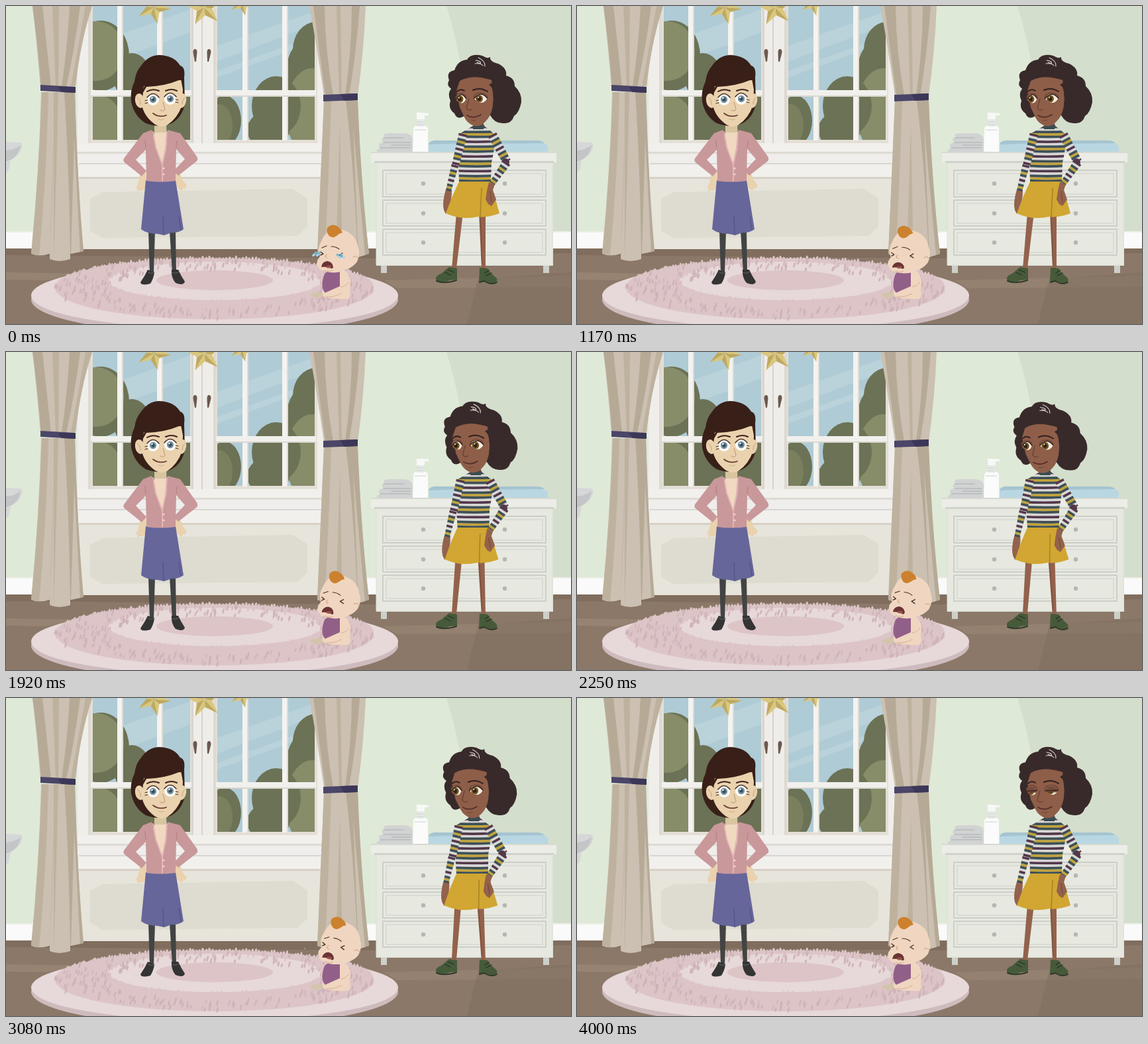
An HTML page with a canvas that plays this animation: 853x480 px, repeating every 4080 ms.

```html
<!DOCTYPE html>
<html lang="en">
<head>
<meta charset="utf-8">
<title>Nursery</title>
<style>
html, body { margin: 0; width: 100%; height: 100%; overflow: hidden; }
canvas { display: block; width: 853px; height: 480px; }
</style>
</head>
<body>
<canvas id="stage" width="853" height="480"></canvas>
<script>
const LOOP = 4080, STEP = 250 / 3;
const stage = document.getElementById('stage').getContext('2d');
const backdrop = document.createElement('canvas');
backdrop.width = 853;
backdrop.height = 480;
let c = backdrop.getContext('2d');

function shape(d, fill) {
  c.fillStyle = fill;
  c.fill(new Path2D(d));
}
function line(d, color, width = 1) {
  c.strokeStyle = color;
  c.lineWidth = width;
  c.lineCap = c.lineJoin = 'round';
  c.stroke(new Path2D(d));
}
function box(x, y, w, h, fill) {
  c.fillStyle = fill;
  c.fillRect(x, y, w, h);
}
function oval(x, y, rx, ry, fill, turn = 0) {
  c.fillStyle = fill;
  c.beginPath();
  c.ellipse(x, y, rx, ry, turn, 0, Math.PI * 2);
  c.fill();
}
function clipped(d, draw) {
  c.save();
  c.clip(new Path2D(d));
  draw();
  c.restore();
}
function seeded(seed) {
  return () => (seed = (seed * 16807) % 2147483647) / 2147483647;
}
function keyed(t, keys) {
  for (let i = 1; i < keys.length; i++) {
    const [t0, a] = keys[i - 1], [t1, b] = keys[i];
    if (t <= t1) {
      const p = Math.max(0, (t - t0) / (t1 - t0));
      return a + (b - a) * p * p * (3 - 2 * p);
    }
  }
  return keys[keys.length - 1][1];
}

function room() {
  box(0, 0, 853, 480, '#dfe9d7');
  shape('M665 0Q677 38 686 85L730 220V366H853V0Z', '#d4decd');
  box(0, 340, 853, 27, '#fafafa');
  box(0, 340, 853, 2, '#eef0ea');
  box(0, 366, 853, 114, '#8b7868');
  shape('M0 366H853V373L560 381L0 376Z', '#806d5d');
  shape('M0 402L120 404L60 414L0 413Z', '#968371');
  shape('M570 414L853 407V424L590 426Z', '#948170');
  shape('M713 412L853 402V480H696Z', '#7f6c5c80');
  shape('M0 205L22 206Q27 209 22 219Q15 231 0 235Z', '#d6d7d8');
  shape('M0 218Q13 217 22 210Q20 228 0 235Z', '#c3c5c7');
  shape('M0 236L7 233L4 248L0 251Z', '#d5d7d7');
}

function star(x, y, r, turn) {
  const at = (i, q) => {
    const a = turn + i * Math.PI / 5;
    return `${x + Math.sin(a) * q} ${y - Math.cos(a) * q}`;
  };
  for (let i = 0; i < 10; i++) {
    const q = i % 2 ? r * .42 : r, n = i % 2 ? r : r * .42;
    shape(`M${x} ${y}L${at(i, q)}L${at(i + 1, n)}Z`, i % 2 ? '#d9c77e' : '#bfa95f');
  }
}

function windowWall() {
  const dark = '#6c7255', light = '#878c69';
  box(108, 0, 372, 262, '#efeeeb');
  box(124, 0, 4, 208, '#dfdad1');
  box(128, 0, 342, 207, '#e4dfd6');
  clipped('M131 0H278V202H131ZM319 0H466V202H319Z', () => {
    box(128, 0, 342, 207, '#afcbd5');
    shape('M176 42L278 5V40L176 78ZM319 60L466 8V28L319 84Z', '#bad2da');
    shape('M319 98L466 45V54L319 108Z', '#bad2da');
    oval(143, 75, 43, 53, dark);
    oval(190, 106, 28, 35, dark);
    oval(136, 68, 42, 45, light);
    oval(178, 180, 54, 54, dark);
    oval(137, 176, 38, 42, light);
    oval(270, 180, 28, 50, dark);
    oval(330, 173, 25, 38, dark);
    oval(322, 180, 20, 32, '#7a805e');
    oval(468, 66, 35, 42, dark);
    oval(456, 100, 33, 50, dark);
    oval(462, 160, 40, 66, light);
    oval(408, 151, 37, 45, dark);
    oval(396, 187, 32, 28, dark);
  });
  for (const x of [168, 228, 357, 417]) {
    box(x, 0, 9, 203, '#f4f3f0');
    box(x + 7, 0, 2, 203, '#dedbd3');
  }
  for (const x of [128, 316]) {
    box(x, 127, 152, 10, '#f1f0ed');
    box(x, 135, 152, 2, '#d9d7ce');
  }
  box(280, 0, 36, 207, '#efedea');
  box(280, 0, 3, 220, '#dcd5cc');
  box(295, 0, 2, 220, '#d8d2c9');
  box(313, 0, 4, 207, '#ded9d0');
  for (const [x, lean] of [[285.5, 1.5], [306.5, -.5]]) {
    shape(`M${x - 3} 70Q${x - 3} 65 ${x} 65Q${x + 3} 65 ${x + 3} 70L${x + lean} 84H${x + lean - 2}Z`, '#695950');
  }
  box(108, 207, 372, 14, '#f1f0ed');
  box(108, 220, 372, 3, '#dedbd4');
  box(104, 223, 380, 15, '#efeeec');
  box(110, 237, 370, 2, '#d9d7d2');
  box(110, 239, 370, 20, '#f1f0ed');
  box(110, 258, 370, 3, '#d7d0c6');
  box(110, 261, 370, 106, '#e7e4db');
  shape('M127 291L146 281L433 276L455 290V333L440 347L145 350L127 339Z', '#dedbd0');
  star(223, 2, 26, .4);
  star(299, 2, 29, -.15);
  star(357, -4, 19, .4);
}

function curtains() {
  const cloth = '#cbc0b1', fold = '#b6aa96', soft = '#beb29f';
  shape('M40 0H130Q112 55 105 121L52 124Q47 60 40 0Z', cloth);
  shape('M40 0H55L68 122H53Q48 60 40 0Z', fold);
  shape('M70 0H80L79 121H75Z', soft);
  shape('M96 0H112Q104 62 91 122H84Q93 60 96 0Z', fold);
  shape('M120 0H130Q112 55 105 121L98 122Q109 60 120 0Z', soft);
  shape('M53 130L104 130Q108 270 117 370L97 374V382Q80 388 66 382V374Q50 379 38 374Q50 250 53 130Z', cloth);
  shape('M54 130H64Q61 260 50 376L38 374Q50 250 54 130Z', soft);
  shape('M72 180L66 381V374Q72 260 72 130H79Q76 260 72 384Z', soft);
  shape('M88 130H104Q108 270 117 370L97 374Q95 240 88 130Z', fold);
  shape('M103 200L112 371L98 374Z', cloth);
  shape('M52 119L105 122V131L52 128Z', '#4b4568');
  shape('M78 122L105 122V131L84 130Z', '#3c3758');
  shape('M458 0H543Q540 70 531 135H480Q470 65 458 0Z', cloth);
  shape('M464 0H481Q482 70 494 135H482Q473 65 464 0Z', fold);
  shape('M499 0H505L507 135H503Z', soft);
  shape('M522 0H534Q529 70 518 135H512Q522 65 522 0Z', fold);
  shape('M480 142H531Q536 270 548 374L531 379Q499 385 470 374Q475 260 480 142Z', cloth);
  shape('M480 142H491Q487 270 481 378L470 374Q475 260 480 142Z', soft);
  shape('M504 180L498 380L508 381Z', soft);
  shape('M513 142H531Q536 270 548 374L531 379Q526 250 513 142Z', fold);
  shape('M524 180L542 376L532 379Z', cloth);
  shape('M479 134L531 132V142L479 144Z', '#4b4568');
  shape('M505 133L531 132V142L510 143Z', '#3c3758');
}

function dresser() {
  shape('M565 215Q559 207 570 206Q563 199 573 199Q565 192 580 192H602Q613 193 614 201V220H560Q558 216 565 215Z', '#d1d3d3');
  line('M570 199H600M570 206H611M565 214H611M582 210H611', '#b8bbbc', 1.3);
  shape('M638 208Q640 202 655 203H802Q812 203 814 210V216H638Z', '#a5c4d0');
  shape('M638 209Q700 206 740 208L812 207Q819 208 818 220H638Z', '#b9d7e2');
  shape('M615 186Q615 182 619 181H633Q637 182 637 186V220H614Z', '#fafbfa');
  box(621, 171, 10, 11, '#e6e9e8');
  shape('M620 169V163L618 162Q620 160 638 162V165H632V171H620Z', '#f7f8f7');
  line('M621 175H630M621 179H630M617 187H634', '#cbd1d0');
  box(566, 390, 9, 13, '#cdcfc9');
  box(811, 390, 9, 13, '#cdcfc9');
  box(559, 233, 267, 159, '#e7e9e0');
  box(551, 220, 280, 16, '#ecede7');
  box(551, 220, 280, 2, '#d6d9d2');
  box(556, 234, 271, 3, '#cfd3cb');
  line('M559 237V391H825V237', '#dcdfd7');
  for (const [y, h] of [[248, 40], [293, 39], [337, 39]]) {
    c.strokeStyle = '#cbcfc8';
    c.lineWidth = 2;
    c.strokeRect(569, y, 246, h);
    c.strokeStyle = '#dadcd5';
    c.strokeRect(574, y + 5, 236, h - 9);
    oval(630, y + 20, 3.2, 3.2, '#b4b7b1');
    oval(753, y + 20, 3.2, 3.2, '#b4b7b1');
  }
}

function rug() {
  const rnd = seeded(41), rose = '#dcc4c7', pale = '#e7d8d9', tuft = '#ceb3b7';
  oval(315, 443, 277, 52, '#cebbbd');
  oval(315, 437, 277, 50, pale);
  oval(315, 427, 239, 46, rose);
  for (let i = 0; i < 150; i++) {
    const a = Math.PI + Math.PI * i / 149, x = 315 + 238 * Math.cos(a), y = 427 + 44 * Math.sin(a);
    oval(x, y, 2.2, 3 + rnd() * 4, rose, .3 * (rnd() - .5));
  }
  oval(316, 415, 161, 29, pale);
  oval(315, 414, 88, 15, rose);
  for (let i = 0; i < 300; i++) {
    const a = rnd() * Math.PI * 2, r = .68 + rnd() * .34;
    oval(315 + 237 * r * Math.cos(a), 427 + 43 * r * Math.sin(a), 1.4, 3 + rnd() * 1.7, i % 3 ? tuft : '#d4babe', .25);
  }
  for (let i = 0; i < 50; i++) {
    const a = rnd() * Math.PI * 2;
    oval(315 + 163 * Math.cos(a), 416 + 30 * Math.sin(a), 1.5, 4, rose, .2);
  }
}

function mother() {
  const skin = '#ead2ae', hair = '#382019', pink = '#c9989a', ink = '#343434';
  shape('M215 340H225L223 404H217ZM247 340H256L257 402H251Z', '#414443');
  shape('M214 398L224 402Q223 411 218 419Q204 423 203 417Q210 407 214 398Z', ink);
  shape('M250 398L260 398Q264 407 270 416Q268 423 256 418Q249 410 250 398Z', ink);
  line('M215 402Q220 405 224 402M250 402Q255 405 261 401', '#656767');
  shape('M202 254L211 251L212 270Q209 281 203 278L198 280L199 275L196 276Q201 266 202 254Z', skin);
  shape('M256 250L264 255Q266 265 273 270L270 276L267 275L266 279Q258 277 255 266Z', skin);
  shape('M211 263H256L268 337Q260 343 250 342L239 346L229 344Q213 344 204 337Z', '#66669a');
  line('M237 318L238 345M261 318L264 338', '#55558a', 1.5);
  shape('M224 174H242V194L250 205L235 230L217 204L224 193Z', '#d9c59f');
  shape('M224 191H242L244 220L235 240L220 212Z', '#f0d9c0');
  shape('M220 187L207 192L178 230Q176 234 180 237L205 257L212 249L196 232L211 217L212 264Q233 267 256 264L257 216L270 231L253 249L260 256L287 235Q291 232 288 227L263 192L244 187L242 216L236 239L226 213Z', pink);
  line('M222 190L226 213L236 240L241 214L243 190M236 240V264', '#e2b5b5', 2);
  line('M211 214L210 202M257 214L258 203', '#b48286', 1.2);
  for (const y of [245, 254]) oval(238, y, 1.5, 1.5, '#f0d5cf');
  shape('M204 90Q215 74 232 74Q254 75 263 90Q271 92 269 108L270 148Q266 168 250 177Q233 185 211 177Q193 166 189 144Q187 128 194 114Q196 99 204 90Z', hair);
  oval(266, 143, 6, 11, skin, .18);
  oval(202, 143, 7, 11, skin, -.2);
  shape('M208 121Q230 121 252 109L262 99L267 126L266 149Q259 170 243 180Q234 185 224 178Q207 165 205 148Z', skin);
  shape('M205 134Q206 111 242 103L267 96L269 112L261 112Q240 121 212 122Z', hair);
  line('M198 138Q204 142 203 149M270 138Q266 141 266 148', '#c6a17d');
  for (const [x, y, side] of [[222, 141, -1], [248, 140, 1]]) {
    oval(x, y, 9, 9, '#fcfcfa');
    oval(x, y, 5.1, 5.3, '#748f9c');
    oval(x, y, 2.5, 2.7, '#334b58');
    oval(x - 1.5, y - 2, 1.2, 1.2, '#fff');
    line(`M${x - 9} ${y - 3}Q${x} ${y - 14} ${x + 9} ${y - 3}`, '#4b352d', 1.6);
    for (const n of [1, 5]) line(`M${x + side * 8} ${y + n}L${x + side * 12} ${y + n + 1}`, '#3b2923');
  }
  line('M213 129Q221 124 231 128M241 128Q250 124 258 128', '#3a241d', 2);
  line('M237 145L240 156Q237 160 233 157', '#c7a17d', 1.2);
  line('M222 162Q231 169 242 165', '#6b3d32', 1.8);
  line('M230 171Q234 173 238 171', '#d4ac89');
}

const KNIT = ['#53384a', '#d8d7d6', '#3d5057', '#c1a33f', '#3d5057', '#d8d7d6'];

function sleeve(x0, y0, x1, y1, w0, w1) {
  const len = Math.hypot(x1 - x0, y1 - y0);
  c.save();
  c.translate(x0, y0);
  c.rotate(Math.atan2(y1 - y0, x1 - x0));
  clipped(`M0 ${-w0 / 2}L${len} ${-w1 / 2}V${w1 / 2}L0 ${w0 / 2}Z`, () => {
    for (let x = 0, i = 0; x < len; x += 3.7, i++) box(x, -w0, 4, w0 * 2, KNIT[i % 6]);
  });
  c.restore();
}

function friendHead(lid) {
  const skin = '#8e5e49', dark = '#764a39', hair = '#382a2a';
  shape('M677 97Q682 82 696 81Q702 71 719 75Q727 80 731 77Q730 84 743 87Q757 94 755 105Q768 108 768 121Q779 131 778 145Q775 161 767 166Q763 178 752 177Q738 178 731 165L692 166Q681 173 677 162Q667 155 671 143Q666 132 672 125Q664 119 669 112Q664 99 677 97Z', hair);
  shape('M680 128L685 113Q704 103 733 110L736 140Q735 162 726 172Q717 183 707 181Q697 178 692 168L685 153Z', skin);
  shape('M681 130Q678 119 686 112Q704 102 737 113L733 99L700 98L678 110Z', hair);
  shape('M729 119Q738 123 735 151Q744 157 747 140L741 111Z', hair);
  line('M709 82Q718 83 716 87L711 85M713 78Q724 83 723 91M708 87Q717 86 720 90', '#d9d3d2', 1.1);
  for (const [x, y, rx] of [[687, 140.5, 7.5], [716.5, 140, 10]]) {
    oval(x, y - 2, rx + 1, 7.5, dark);
    clipped(`M${x - rx} ${y}Q${x - 2} ${y - 15} ${x + rx} ${y}Q${x + 2} ${y + 12} ${x - rx} ${y}Z`, () => {
      box(x - 12, y - 9, 24, 18, '#f4eee2');
      oval(x - 2, y, 5.4, 5.8, '#75521e');
      oval(x - 2, y, 2.8, 3.1, '#302015');
      oval(x - 3.3, y - 2, 1, 1, '#fff');
      box(x - 12, y - 9, 24, 2 + lid * 13, dark);
    });
    const top = y - 13 + lid * 18;
    line(`M${x - rx} ${y}Q${x} ${top} ${x + rx} ${y - 1}`, '#382622', 1.5);
  }
  line('M681 129Q686 124 692 128M705 127Q716 122 727 129', '#30211f', 2);
  line('M699 140L695 154Q698 159 703 156', '#66402f', 1.2);
  line('M696 165Q705 171 717 164', '#56302a', 1.8);
  line('M703 173Q707 174 710 172', '#70432f');
}

function friend(t) {
  const skin = '#93624c', sway = keyed(t, [[1250, 0], [1500, -.3], [2250, -9], [3670, -9], [4000, 0]]);
  const nod = keyed(t, [[1170, 0], [1500, -2], [2000, -1], [2250, 0], [2920, 1], [3670, 1], [4000, 0]]);
  const dip = keyed(t, [[1500, 0], [2250, 1.5], [2920, 0]]);
  const lid = keyed(t, [[3580, 0], [3670, .3], [3830, 1], [4000, .72], [4080, 0]]);
  c.save();
  c.transform(1, 0, -sway / 300, 1, sway * 4 / 3, 0);
  shape('M680 312H690L680 396H673ZM714 312H724L724 397H718Z', skin);
  line('M716 320L719 389', '#7d503d', 1.3);
  shape('M664 277L673 278Q673 293 669 302L664 314L661 308Q658 297 664 277Z', skin);
  shape('M685 263H731L745 313Q727 320 713 318Q688 324 664 313Q672 290 685 263Z', '#d1a632');
  line('M718 275L716 318', '#a88224', 1.5);
  shape('M705 175H721V194H705Z', '#7d503d');
  const torso = 'M705 181Q713 184 722 181L737 193Q739 214 733 236L732 265H684L683 234Q679 210 686 192Z';
  clipped(torso, () => {
    for (let y = 180, i = 0; y < 267; y += 3.7, i++) {
      c.fillStyle = KNIT[i % 6];
      c.beginPath();
      c.moveTo(675, y);
      c.quadraticCurveTo(710, y + 2, 745, y);
      c.lineTo(745, y + 4);
      c.quadraticCurveTo(710, y + 6, 675, y + 4);
      c.fill();
    }
  });
  sleeve(690, 193, 678, 243, 13, 11);
  sleeve(678, 240, 668, 279, 11, 8);
  sleeve(734, 194, 756, 235, 14, 13);
  oval(754, 236, 6, 6, '#53384a');
  sleeve(756, 236, 734, 268, 13, 9);
  shape('M729 266L738 269L735 278L740 292L733 302L728 299L724 292L726 279Z', skin);
  line('M731 280L733 296', '#72452f');
  shape('M705 179Q713 182 722 179L721 186H705Z', '#394d50');
  c.translate(nod, dip);
  friendHead(lid);
  c.restore();
  const boot = '#465a3a';
  shape('M669 394L681 396L681 413L670 414Q663 418 650 415Q646 408 657 404Z', boot);
  shape('M715 395L727 396L732 403L741 411Q743 419 734 419L722 415L714 417Z', boot);
  line('M650 415Q661 420 680 414M715 417L722 415Q733 422 741 417', '#2e3728', 2);
  line('M663 402L671 406M667 398L676 402M723 403L729 399M725 407L733 403', '#263020', 1.3);
}

function baby(t) {
  const skin = '#f0d6c0', ink = '#493529';
  const turn = keyed(t, [[0, 0], [750, -.045], [1500, .02], [2250, .075], [3080, .09], [3670, .08], [4000, 0]]);
  const drop = keyed(t, [[0, 0], [750, 2], [1500, .5], [2250, 0], [4080, 0]]);
  const open = keyed(t, [[0, 1], [750, .75], [1500, 1], [4080, 1]]);
  oval(470, 436, 10, 4, '#d3c5a9', -.1);
  shape('M482 428Q503 421 518 426Q522 436 517 442Q494 443 480 439Q475 433 482 428Z', skin);
  shape('M481 404Q495 392 508 403L512 423Q503 431 483 434Q473 425 481 404Z', '#925f88');
  shape('M504 399Q518 398 520 416L519 430Q508 436 492 437L480 439Q479 433 486 431L504 423Z', skin);
  line('M506 424Q514 423 517 417M483 439Q495 440 506 434', '#d6ae90');
  c.save();
  c.translate(500, 405 + drop);
  c.rotate(turn);
  c.translate(-500, -405);
  shape('M476 355Q483 336 503 337Q527 341 531 362Q536 373 530 386Q525 393 516 397Q499 406 479 400Q468 396 470 384L474 378Q469 367 476 355Z', skin);
  shape('M485 335Q490 329 497 331Q505 334 508 342Q503 343 499 347Q492 352 487 346Q483 340 485 335Z', '#cc812e');
  line('M524 379Q529 376 531 380', '#d5aa8b', 1.2);
  line('M477 365L484 362M491 363Q498 363 503 367', ink, 1.1);
  line('M475 371L479 374L475 376M508 373L503 376L508 379', ink, 1.4);
  line('M484 375Q480 379 485 380', '#ce9d7a', 1.1);
  c.save();
  c.translate(485, 390);
  c.scale(1, open);
  shape('M-9 4Q-8 -4 0 -5Q8 -4 9 4Q8 8 4 5Q-3 3 -9 4Z', '#6b3434');
  oval(2, 3.5, 4, 2, '#96504e');
  c.restore();
  line('M481 399Q487 402 493 399', '#d7ac90');
  c.restore();
  tears(t);
}

function tears(t) {
  const blue = '#78b7d3', flow = t / 420;
  if (flow < 1) {
    c.globalAlpha = 1 - flow * flow;
    for (const [x, y, dir] of [[473, 373, -1], [501, 376, 1]]) {
      for (let i = 0; i < 4; i++) {
        const d = i * 2.8 + flow * 8;
        oval(x + dir * d, y + i % 2 * 3 + flow * 7, 2.6, 1.8, i % 2 ? '#a9d5e6' : blue, dir * .5);
      }
    }
  }
  if (t > 2990 && t < 3170) {
    c.globalAlpha = .45;
    oval(451, 378, 1.8, 1, '#b0c5cb', .5);
    oval(456, 389, 2, 1, '#b0c5cb');
  }
  c.globalAlpha = 1;
}

[room, windowWall, curtains, dresser, rug, mother].forEach(draw => draw());
c = stage;

const start = performance.now();
function render(now) {
  const elapsed = Math.max(0, now - start) % LOOP;
  const t = Math.floor((elapsed + 5) / STEP) * STEP;
  c.drawImage(backdrop, 0, 0);
  friend(t);
  baby(t);
  requestAnimationFrame(render);
}
render(start);
</script>
</body>
</html>
```
